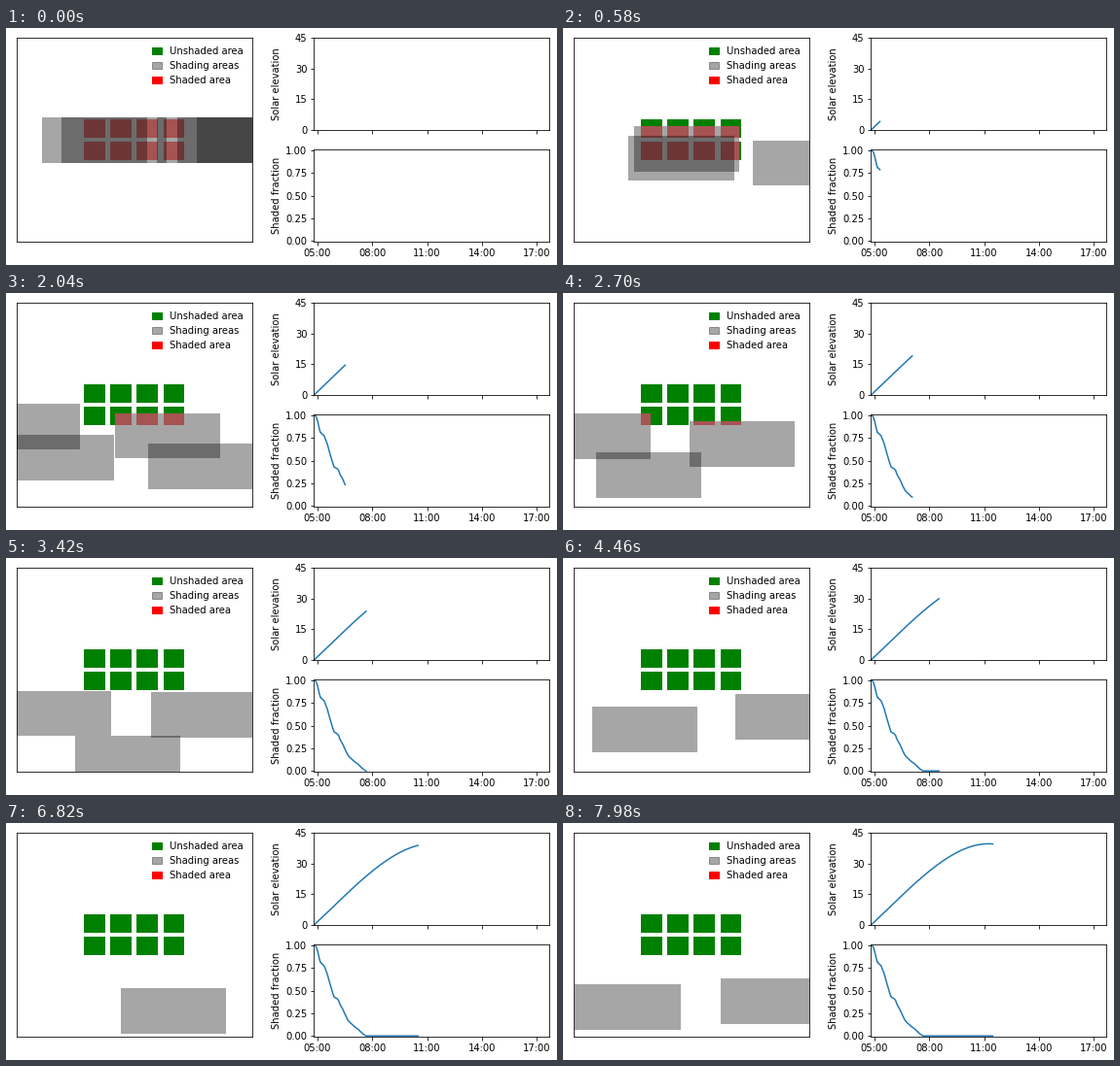
Recreate the animation shown at these times as a matplotlib script. Size 566 px wide and 244 px high, loop 8000 ms.

```python
import numpy as np
import matplotlib.pyplot as plt
from matplotlib.animation import FuncAnimation
from matplotlib.collections import PolyCollection
from matplotlib.patches import Patch

W, H, DPI = 566, 244, 72
FRAMES = 400                       # one frame per minute of the day
START, END = 4 + 49 / 60, 17 + 42 / 60
LAT, NOON = np.radians(54.98), 11.247

# Collector is 2 x 1; only trackers nearer than its diagonal can shade it
HALF_W, HALF_H = 1.0, 0.5
REACH = np.sqrt(5)
PITCH = np.sqrt(2 / 0.3 / (np.sqrt(3) / 2))

# Hexagonal field around the tracker at the origin
FIELD = [(PITCH * (i + j / 2), PITCH * j * np.sqrt(3) / 2)
         for i in range(-2, 3) for j in range(-2, 3) if (i, j) != (0, 0)]

# Active cells as (x0, y0, x1, y1)
CELLS = [(x, y, x + 0.4, y + 0.4)
         for y in (-0.45, 0.05) for x in (-0.95, -0.45, 0.05, 0.55)]


def cell_samples(starts, n):
    step = (np.arange(n) + 0.5) / n * 0.4
    return np.concatenate([s + step for s in starts])


XS = cell_samples((-0.95, -0.45, 0.05, 0.55), 100)
YS = cell_samples((-0.45, 0.05), 200)


def sun(t):
    """Elevation and azimuth in radians at hour t."""
    dec = np.radians(4.52 + 0.0161 * (t - 5))
    ha = np.radians(15 * (t - NOON))
    el = np.arcsin(np.sin(LAT) * np.sin(dec)
                   + np.cos(LAT) * np.cos(dec) * np.cos(ha))
    az = np.pi + np.arctan2(np.sin(ha) * np.cos(dec),
                            np.cos(ha) * np.sin(LAT) * np.cos(dec)
                            - np.sin(dec) * np.cos(LAT))
    return el, az


def shades(t):
    """Boxes of the trackers in front, seen from the sun."""
    el, az = sun(t)
    out = []
    for east, north in FIELD:
        ahead = east * np.sin(az) + north * np.cos(az)
        x = north * np.sin(az) - east * np.cos(az)
        y = -ahead * np.sin(el)
        if ahead > 0 and np.hypot(x, y) < REACH:
            out.append((x - HALF_W, y - HALF_H, x + HALF_W, y + HALF_H))
    return out


def overlaps(boxes):
    out = []
    for a in CELLS:
        for b in boxes:
            x0, y0 = max(a[0], b[0]), max(a[1], b[1])
            x1, y1 = min(a[2], b[2]), min(a[3], b[3])
            if x1 > x0 and y1 > y0:
                out.append((x0, y0, x1, y1))
    return out


def shaded_fraction(boxes):
    hit = np.zeros((XS.size, YS.size), bool)
    for x0, y0, x1, y1 in boxes:
        in_x, in_y = (XS > x0) & (XS < x1), (YS > y0) & (YS < y1)
        if in_x.any() and in_y.any():
            hit |= np.outer(in_x, in_y)
    return hit.mean()


def verts(boxes):
    return [[(x0, y0), (x1, y0), (x1, y1), (x0, y1)]
            for x0, y0, x1, y1 in boxes]


hours = START + np.arange(FRAMES) / 60
elevation = np.degrees(sun(hours)[0])
fraction = np.array([shaded_fraction(shades(t)) for t in hours])

fig = plt.figure(figsize=(W / DPI, H / DPI), dpi=DPI, facecolor="white")


def add_grid(left, rows, hspace=0):
    """Column of axes 242 px wide and 210 px high in all."""
    grid = fig.add_gridspec(rows, 1, left=left / W, right=(left + 242) / W,
                            top=1 - 10.1 / H, bottom=1 - 220.1 / H,
                            hspace=hspace)
    return grid.subplots()


field = add_grid(10.75, 1)
top, low = add_grid(316.4, 2, hspace=20 / 95)

field.set(xlim=(-REACH, REACH), ylim=(-REACH, REACH), xticks=[], yticks=[])


def add_boxes(color, **kw):
    return field.add_collection(
        PolyCollection([], facecolor=color, linewidth=0, **kw))


green = add_boxes("green", zorder=1)
green.set_verts(verts(CELLS))
red = add_boxes((1, 0.5, 0.5), zorder=2)
gray = add_boxes("black", alpha=0.35, zorder=3)

field.legend(handles=[Patch(color="green", label="Unshaded area"),
                      Patch(color="black", alpha=0.35, label="Shading areas"),
                      Patch(color="red", label="Shaded area")],
             loc="upper right", frameon=False, handlelength=1)

ticks = [5, 8, 11, 14, 17]
for ax in (top, low):
    ax.set_xlim(START, END)
    ax.set_xticks(ticks, [f"{h:02d}:00" for h in ticks])
top.tick_params(labelbottom=False)
top.set(ylim=(0, 45), yticks=[0, 15, 30, 45], ylabel="Solar elevation")
low.set(ylim=(-0.01, 1.01), yticks=[0, 0.25, 0.5, 0.75, 1],
        ylabel="Shaded fraction")
fig.align_ylabels([top, low])

el_line, = top.plot([], [], color="C0", lw=1.5)
fr_line, = low.plot([], [], color="C0", lw=1.5)


def update(k):
    boxes = shades(hours[k])
    gray.set_verts(verts(boxes))
    red.set_verts(verts(overlaps(boxes)))
    el_line.set_data(hours[:k + 1], elevation[:k + 1])
    fr_line.set_data(hours[:k + 1], fraction[:k + 1])
    return red, gray, el_line, fr_line


anim = FuncAnimation(fig, update, frames=FRAMES, interval=20, repeat=True)
plt.show()
```
